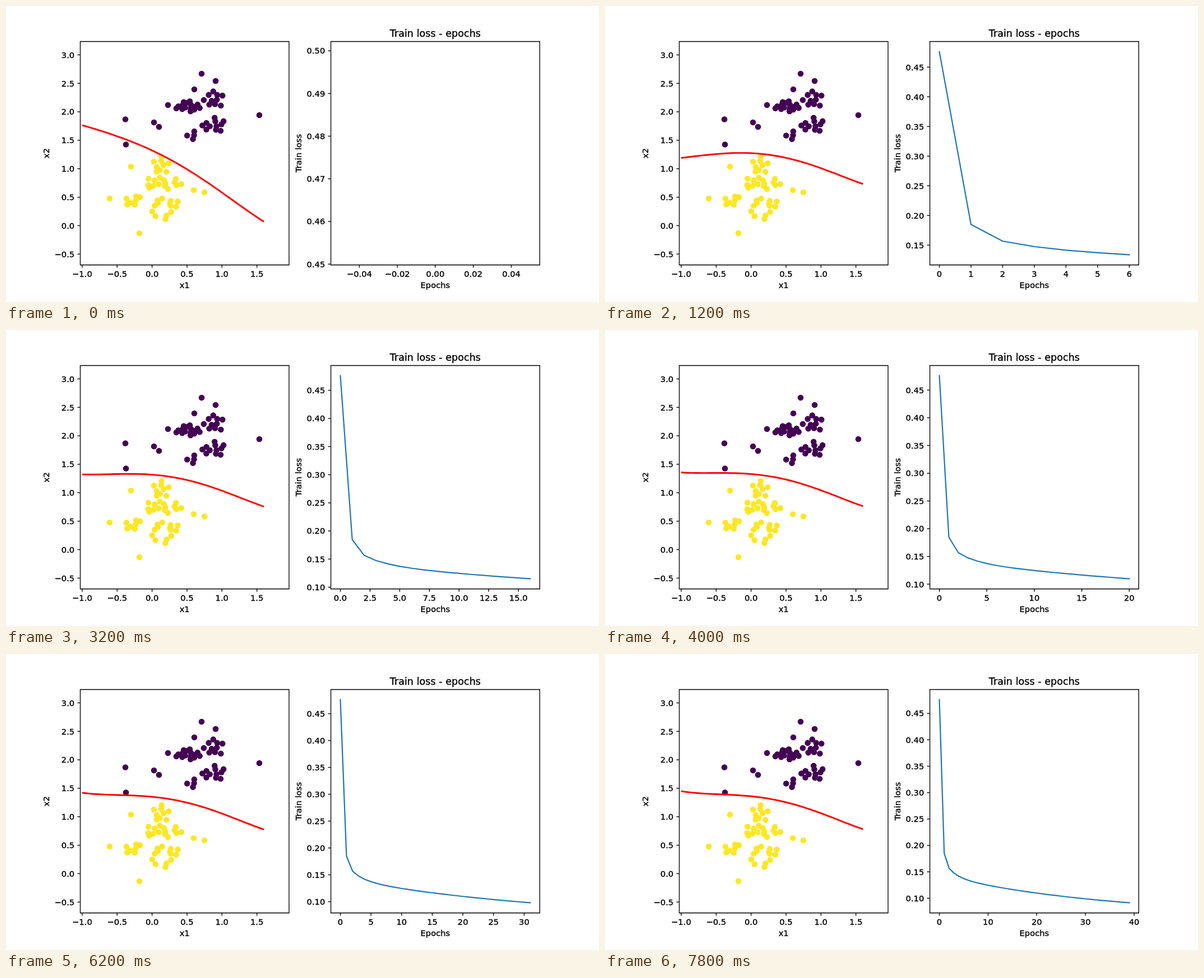
Write an HTML page that moves like this. It is 1058 px wide and 529 px high and loops after 8 s.

```html
<!DOCTYPE html>
<html lang="en">
<head>
<meta charset="utf-8">
<title>Train loss</title>
<style>
  html, body { margin: 0; width: 100%; height: 100%; overflow: hidden; background: #fff; }
  svg { display: block; width: 1058px; height: 529px; }
  text { font: 14.69px "DejaVu Sans", sans-serif; fill: #000; stroke: #000; stroke-width: .35; }
  .title { font-size: 17.63px; }
  .axis { fill: none; stroke: #000; stroke-width: 1.35; }
  .loss { fill: none; stroke: #1f77b4; stroke-width: 2.2; stroke-linejoin: round; stroke-linecap: square; }
  .edge { fill: none; stroke: #f00; stroke-width: 2.94; stroke-linejoin: round; }
</style>
</head>
<body>
<svg viewBox="0 0 1058 529">
  <g id="base"></g>
  <path id="edge" class="edge"/>
  <g id="plot"></g>
</svg>
<script>
const STEP = 200, EPOCHS = 40;
const TOP = 63.5, BOTTOM = 462.7, MID = (TOP + BOTTOM) / 2;
const LEFT = { x0: 132.5, x1: 505 }, RIGHT = { x0: 579.6, x1: 952.3 };

const { exp, sin, cos, sqrt, floor, ceil, round, abs, log10 } = Math;
const $ = id => document.getElementById(id);

// Each class: a few random clouds and its outlying points
const groups = [
  { fill: "#440154",
    clouds: [
      { x: 325, y: 180, rx: 23, ry: 10, n: 16 },
      { x: 373, y: 166, rx: 21, ry: 16, n: 10 },
      { x: 370, y: 213, rx: 21, ry: 16, n: 11 },
      { x: 332, y: 230, rx: 16, ry: 8, n: 4 }],
    outliers: [[349, 121], [374, 134], [336, 149], [213, 202.5], [214, 247.5], [264, 208], [273, 216], [452, 195], [289, 177]] },
  { fill: "#fde725",
    clouds: [
      { x: 275, y: 284, rx: 20, ry: 15, n: 9 },
      { x: 280, y: 316, rx: 35, ry: 13, n: 15 },
      { x: 227, y: 347, rx: 15, ry: 13, n: 7 },
      { x: 285, y: 352, rx: 30, ry: 9, n: 9 },
      { x: 279, y: 373, rx: 29, ry: 9, n: 5 }],
    outliers: [[223, 287], [185, 344], [238, 406], [335, 329], [354, 333]] }];

let seed = 7;
function random() {
  seed = (seed * 16807) % 2147483647;
  return seed / 2147483647;
}

// Golden-angle spread with jitter
function cloudPoints({ x, y, rx, ry, n }) {
  return Array.from({ length: n }, (_, i) => {
    const a = i * 2.4 + random() * .7, r = sqrt((i + random()) / n);
    return [x + rx * r * cos(a), y + ry * r * sin(a)];
  });
}

const lossAt = e => .066 + .0775 * exp(-e / 35) + .0425 * exp(-e / 2.12) + .29 * exp(-2.84 * e);

// Height of the decision boundary: final shape + slow drift + fast first swing
function edgeAt(u, e) {
  const rest = 254.3 + u * (12.75 + u * (14.85 + u * (7 - u * 4.3)));
  const drift = (4.5 + 22 * exp(-1.65 * (u + 1))) * (1.66 * exp(-e / 18) - .19);
  const swing = (-9 + 56 * u - 6 * u * u) * exp(-1.6 * e);
  return rest + drift + swing;
}

function edgePath(e) {
  const points = Array.from({ length: 53 }, (_, i) => {
    const u = -1 + i * .05;
    return `${260.6 + u * 124.7} ${edgeAt(u, e)}`;
  });
  return "M" + points.join("L");
}

const label = (s, x, y, anchor = "middle", extra = "") =>
  `<text x="${x}" y="${y}" text-anchor="${anchor}" ${extra}>${s}</text>`;
const sideLabel = (s, x) => label(s, x, MID, "middle", `transform="rotate(-90 ${x} ${MID})"`);
const tickX = (s, x) => `<path class="axis" d="M${x} ${BOTTOM}v5.1"/>` + label(s, x, 484.2);
const tickY = (s, x, y) => `<path class="axis" d="M${x} ${y}h-5.1"/>` + label(s, x - 10.3, y + 5.3, "end");
const frame = a => `<path class="axis" d="M${a.x0} ${TOP}H${a.x1}V${BOTTOM}H${a.x0}Z"/>`;

// Round tick values inside [lo, hi], at most about n steps
function ticks(lo, hi, n) {
  const raw = (hi - lo) / n, mag = 10 ** floor(log10(raw));
  const step = [1, 2, 2.5, 5, 10].find(s => s * mag >= raw * .999999) * mag;
  let digits = 0;
  while (abs(step * 10 ** digits - round(step * 10 ** digits)) > 1e-6) digits++;
  const out = [];
  for (let i = ceil(lo / step); i * step <= hi; i++) {
    const v = i * step, sign = i < 0 ? "\u2212" : "";
    out.push([v, sign + abs(v).toFixed(digits)]);
  }
  return out;
}

function drawBase() {
  let s = "";
  for (const { fill, clouds, outliers } of groups) {
    for (const [x, y] of [...outliers, ...clouds.flatMap(cloudPoints)]) {
      s += `<circle cx="${x}" cy="${y}" r="5.3" fill="${fill}"/>`;
    }
  }
  s += frame(LEFT);
  for (const [v, t] of ticks(-1.02, 1.95, 8)) s += tickX(t, 260.6 + v * 124.7);
  for (const [v, t] of ticks(-.6, 3.2, 9)) s += tickY(t, LEFT.x0, 392.5 - v * 101.7);
  s += label("x1", 318.7, 504.2) + sideLabel("x2", 77.2);
  s += label("Epochs", 765.9, 504.2) + sideLabel("Train loss", 527.2);
  s += label("Train loss - epochs", 765.9, 54.6, "middle", 'class="title"');
  $("base").innerHTML = s;
}

function drawEpoch(e) {
  $("edge").setAttribute("d", edgePath(e));

  const max = lossAt(0), min = lossAt(e);
  const padX = e ? e * .05 : .055;
  const padY = e ? (max - min) * .05 : max * .055;
  const xLo = -padX, xHi = e + padX, yLo = min - padY, yHi = max + padY;
  const px = v => RIGHT.x0 + (v - xLo) / (xHi - xLo) * (RIGHT.x1 - RIGHT.x0);
  const py = v => BOTTOM - (v - yLo) / (yHi - yLo) * (BOTTOM - TOP);

  const line = Array.from({ length: e + 1 }, (_, i) => `${px(i)} ${py(lossAt(i))}`);
  let s = e ? `<path class="loss" d="M${line.join("L")}"/>` : "";
  s += frame(RIGHT);
  for (const [v, t] of ticks(xLo, xHi, 8)) s += tickX(t, px(v));
  for (const [v, t] of ticks(yLo, yHi, 9)) s += tickY(t, RIGHT.x0, py(v));
  $("plot").innerHTML = s;
}

const start = performance.now();
let shown = -1;
function tick() {
  const e = floor((performance.now() - start) / STEP) % EPOCHS;
  if (e !== shown) drawEpoch(shown = e);
  requestAnimationFrame(tick);
}
drawBase();
tick();
</script>
</body>
</html>
```
